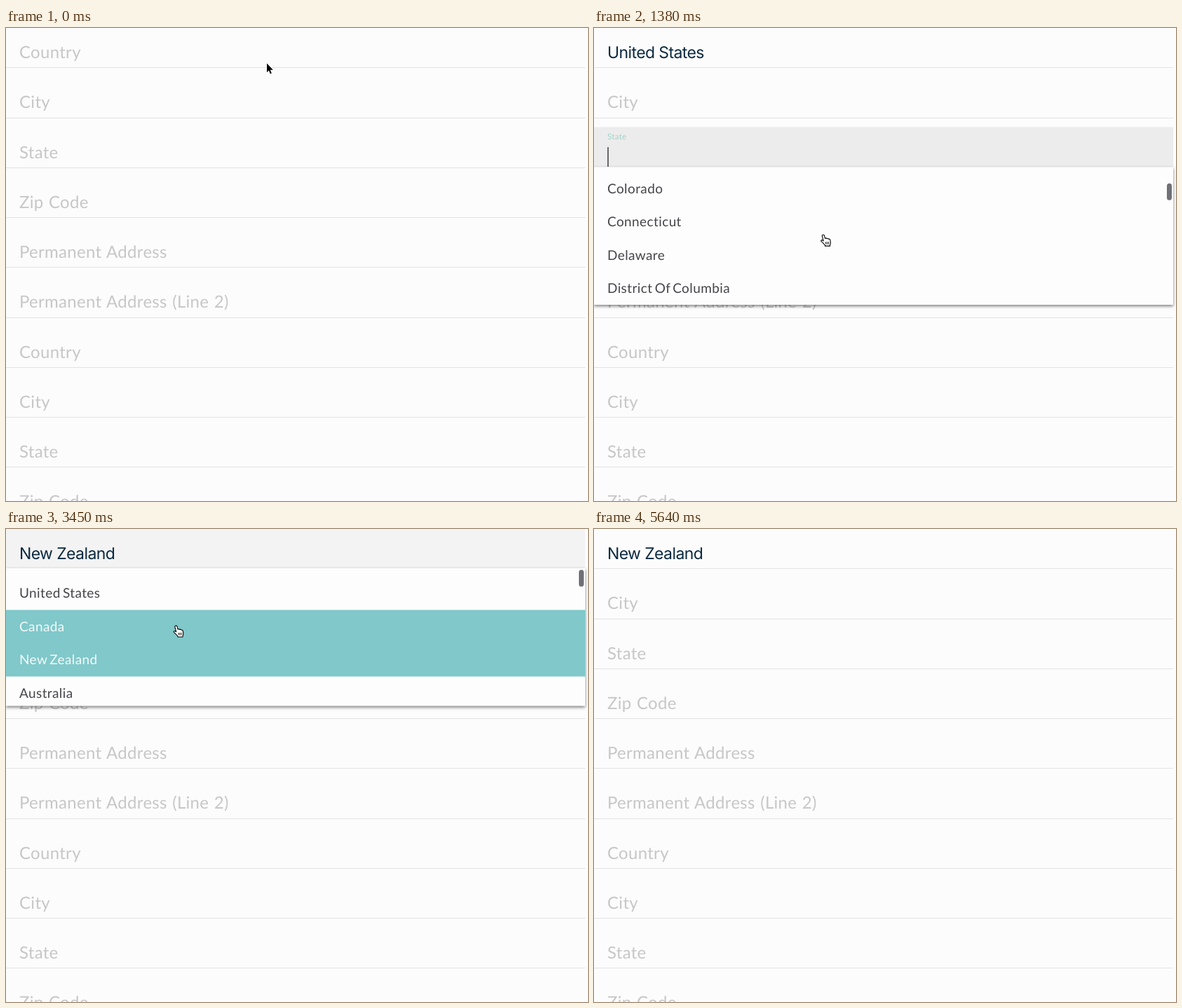
Recreate the animation shown at these times as an HTML page. Size 830x675 px, loop 5670 ms.

```html
<!DOCTYPE html>
<html lang="en">
<head>
<meta charset="utf-8">
<title>Address form</title>
<style>
  html, body { margin: 0; width: 100%; height: 100%; overflow: hidden; background: #fcfcfc; }
  svg { display: block; width: 830px; height: 675px; }
  text { font-family: Lato, sans-serif; text-rendering: geometricPrecision; }
  .label { font-size: 24px; letter-spacing: .3px; word-spacing: 1px; fill: #c7c7c7; }
  .value { font: 23px Inter, sans-serif; letter-spacing: -.6px; fill: #0b2a40; }
  .item { font-size: 19px; letter-spacing: .4px; word-spacing: -2px; }
  .panel { filter: drop-shadow(0 2.5px 2px rgba(0, 0, 0, .5)); }
</style>
</head>
<body>
<svg id="stage" viewBox="0 0 830 675"></svg>
<script>
const LOOP = 5670, STEP = 30;
const PITCH = 71.25, WIDTH = 826, ROW = 47.5, PANEL = 196.5, PAD = 12;

const labels = ['Country', 'City', 'State', 'Zip Code', 'Permanent Address',
  'Permanent Address (Line 2)', 'Country', 'City', 'State', 'Zip Code'];

const lists = {
  countries: ['United States', 'Canada', 'New Zealand', 'Australia', 'Afghanistan'],
  states: ['Alabama', 'Alaska', 'American Samoa', 'Arizona', 'Arkansas', 'California',
    'Colorado', 'Connecticut', 'Delaware', 'District Of Columbia', 'Florida', 'Georgia',
    'Guam', 'Hawaii', 'Idaho', 'Illinois'],
  provinces: ['Alberta', 'British Columbia', 'Manitoba', 'New Brunswick', 'Newfoundland and Labrador']
};

const shut = { list: '', focus: '', hover: -1 };
const pick = (sel, more) => ({ list: 'countries', focus: 'country', sel, hover: -1, ...more });
const choose = (list, more) => ({ list, focus: 'state', sel: -1, hover: -1, ...more });

// Each step changes part of the form state and holds until the next one.
const steps = [
  [0, { country: '', state: '', sel: -1, line: false, ...shut }],
  [210, pick(-1)],
  [300, { hover: 0 }],
  [480, { ...shut, country: 'United States' }],
  [660, choose('states')],
  [1410, { hover: 8 }],
  [1680, { ...shut, state: 'Delaware' }],
  [1770, pick(0)],
  [1800, { hover: 1 }],
  [1860, { hover: 2 }],
  [1980, { ...shut, country: 'New Zealand', state: '' }],
  [2520, { focus: 'state' }],
  [2970, pick(2)],
  [3030, { hover: 1 }],
  [3090, { ...shut, country: 'Canada' }],
  [3180, choose('provinces')],
  [3300, shut],
  [3330, pick(1, { hover: 2 })],
  [3390, { ...shut, country: 'New Zealand' }],
  [3420, pick(2, { hover: 1 })],
  [3540, { ...shut, country: 'Canada' }],
  [3600, choose('provinces')],
  [3780, shut],
  [3810, pick(1, { hover: 2 })],
  [3930, { ...shut, country: 'New Zealand', line: true }],
  [4020, { line: false }],
  [4050, { focus: 'state' }],
  [4890, shut]
];

const scrolls = [[780, 0], [1050, 282.5], [1320, 290]];
const floats = [[660, 0], [750, 1], [1980, 1], [2070, 0], [2520, 0], [2610, 1],
  [2970, 1], [3060, 0], [3150, 0], [3210, 1], [5400, 1], [5520, 0]];

// time, x, y, shape
const moves = [
  [0, 371.5, 50, 'arrow'], [180, 340, 42, 'arrow'], [240, 322, 78, 'hand'],
  [480, 315, 88, 'hand'], [540, 325, 150, 'arrow'], [600, 320, 175, 'beam'],
  [690, 328, 230, 'hand'], [1050, 324.5, 287, 'hand'], [1650, 320, 300, 'hand'],
  [1710, 300, 110, 'arrow'], [1770, 290, 45, 'arrow'], [1800, 270, 110, 'hand'],
  [1830, 254, 162, 'hand'], [1980, 254, 172, 'hand'], [2040, 258, 165, 'beam'],
  [2310, 262, 176, 'beam'], [2700, 270, 172, 'beam'], [2820, 285, 90, 'arrow'],
  [2910, 291, 41, 'arrow'], [3000, 265, 95, 'hand'], [3090, 252, 130, 'hand'],
  [3120, 248, 172, 'beam'], [3210, 245, 230, 'hand'], [3300, 246, 60, 'arrow'],
  [3360, 245, 175, 'hand'], [3420, 240, 80, 'hand'], [3450, 237.5, 137, 'hand'],
  [3540, 234, 132, 'hand'], [3570, 230, 176, 'beam'], [3630, 228, 230, 'hand'],
  [3780, 225, 60, 'arrow'], [3840, 222, 170, 'hand'], [3930, 218, 178, 'hand'],
  [3960, 216, 177, 'beam'], [3990, 214, 176.5, 'beam'], [5370, 215, 182, 'beam'],
  [5430, 208, 176, 'arrow'], [5610, 70, 28, 'arrow'], [5640, 70, 28, '']
];

const typed = { word: 'Wellington', from: 4110, rate: 45, select: 4590, clear: 4620 };

const stage = document.getElementById('stage');

function el(tag, attrs = {}, parent = stage, text = '') {
  const node = document.createElementNS('http://www.w3.org/2000/svg', tag);
  set(node, attrs);
  if (text) node.textContent = text;
  return parent.appendChild(node);
}
function set(node, attrs) {
  for (const key in attrs) node.setAttribute(key, attrs[key]);
}
function show(node, on) {
  node.style.display = on ? '' : 'none';
}
function write(node, text) {
  if (node.textContent !== text) node.textContent = text;
}
function mix(a, b, p) {
  return a + (b - a) * p;
}

// Segment of a keyed table at time t: the two keys and the share between them.
function segment(keys, t) {
  const i = keys.findLastIndex(key => key[0] <= t);
  if (i < 0) return [keys[0], keys[0], 0];
  const a = keys[i], b = keys[i + 1] || a;
  return [a, b, b === a ? 0 : (t - a[0]) / (b[0] - a[0])];
}
function ramp(keys, t) {
  const [a, b, p] = segment(keys, t);
  return mix(a[1], b[1], p);
}

// Form
const countryBack = el('rect', { width: WIDTH, height: 56.5, fill: '#f3f3f3' });
const stateBack = el('rect', { y: 141.5, width: WIDTH, height: 57, fill: '#ececec' });
const fields = labels.map((label, i) => {
  const y = i * PITCH;
  el('rect', { y: Math.round(56.25 + y), width: WIDTH, height: 1, fill: '#e3e3e3' });
  return el('text', { x: 19, y: 43 + y, class: 'label' }, stage, label);
});
const stateLine = el('path', { d: `M0 197.5H${WIDTH}`, stroke: '#acacb8', 'stroke-width': 1.4, 'stroke-dasharray': '5 3' });
const countryLine = el('rect', { y: 56.3, width: WIDTH + 2, height: 1.8, fill: '#a9ccf0' });
const countryText = el('text', { x: 19, y: 42.5, class: 'value' });
const marked = el('rect', { x: 19, y: 161, height: 28, fill: '#b3d7fe' });
const stateText = el('text', { x: 19, y: 183.5, class: 'value' });
const caret = el('rect', { width: 1.2, height: 28, fill: '#111' });

// Dropdown
const clip = el('clipPath', { id: 'view' }, el('defs'));
const clipRect = el('rect', { width: WIDTH }, clip);
const panel = el('g', { class: 'panel' });
const panelBack = el('rect', { width: WIDTH, fill: '#fdfdfd' }, panel);
const inner = el('g', { 'clip-path': 'url(#view)' }, panel);
const rows = lists.states.map(() => ({
  back: el('rect', { width: WIDTH, height: ROW, fill: '#80c8ca' }, inner),
  text: el('text', { x: 19, class: 'item' }, inner)
}));
const thumb = el('rect', { x: 817, width: 7, height: 24, rx: 3.5, fill: '#707078' }, inner);

// Pointers
const outline = { fill: '#fff', stroke: '#000', 'stroke-width': 1.1, 'stroke-linejoin': 'round' };
const pointers = { arrow: el('g'), hand: el('g'), beam: el('g') };
el('path', {
  d: 'M.5 .5V13.2L3.4 10.5 5.4 15.4 7.3 14.6 5.3 9.8H9.3Z',
  stroke: '#fff', 'stroke-width': 1.6, 'paint-order': 'stroke'
}, pointers.arrow);
el('path', {
  d: 'M4 1.2C5 .5 6.2 1.1 6.5 2.2L7.6 6.2C8.6 5.4 9.6 5.6 10 6.5 11 5.8 12 6.1 12.4 7.1 13.4 6.7 14.4 7.2 14.7 8.3'
    + 'L15.3 11.3C15.5 13.3 15 14.3 14.5 15.8V17H7.5V16C6 14 4.5 12.5 2 10.3 1.1 9.3 2.3 8.1 3.6 8.7L5.2 9.7 3.4 3C3.1 2.2 3.4 1.5 4 1.2Z',
  ...outline
}, pointers.hand);
el('path', { d: 'M8.6 11V14.5M10.6 11V14.5M12.6 11V14.5', stroke: '#000', 'stroke-width': .9 }, pointers.hand);
el('path', {
  d: 'M-3.5-8Q0-8 0-6V6Q0 8-3.5 8M3.5-8Q0-8 0-6M0 6Q0 8 3.5 8M-2 2.5H2',
  fill: 'none', stroke: '#111', 'stroke-width': 1.2
}, pointers.beam);

function drawPanel(s, t) {
  show(panel, s.list);
  if (!s.list) return;
  const top = s.focus === 'country' ? 56 : 198.5;
  const height = PANEL * Math.min(1, (t - s.opened + STEP) / 60);
  const scroll = s.list === 'states' ? ramp(scrolls, t)
    : s.list === 'countries' && s.sel === 0 ? PAD : 0;
  set(panelBack, { y: top, height });
  set(clipRect, { y: top, height });
  set(thumb, { y: top + 2.2 + (s.list === 'states' ? scroll * .0725 : 0) });
  rows.forEach((row, i) => {
    const name = lists[s.list][i] || '';
    const y = top + PAD + i * ROW - scroll;
    const lit = name && (i === s.sel || i === s.hover);
    show(row.back, lit);
    set(row.back, { y });
    set(row.text, { y: y + 30, fill: lit ? '#f4fafa' : '#45454a' });
    write(row.text, name);
  });
}

function drawState(s, t) {
  const focused = s.focus === 'state', open = focused && s.list;
  const typing = t >= typed.from && t < typed.clear;
  const count = Math.floor((t - typed.from) / typed.rate);
  const value = typing ? typed.word.slice(0, Math.max(0, count)) : s.state;
  const p = ramp(floats, t), label = fields[2];
  set(label, { y: mix(185.5, open ? 158.5 : 155.5, p) });
  label.style.fontSize = mix(24, 11.5, p) + 'px';
  label.style.fill = p < .5 ? '' : focused ? '#a3d3cb' : '#9c9c9c';
  show(stateBack, focused);
  show(stateLine, focused && !open);
  write(stateText, value);
  const end = value ? stateText.getComputedTextLength() : 0;
  const selected = typing && t >= typed.select;
  show(marked, selected);
  if (selected) set(marked, { width: end });
  show(caret, focused && !selected);
  set(caret, { x: (open ? 19.4 : 18.7) + end, y: open ? 170 : 161 });
}

function drawPointer(t) {
  const [a, b, p] = segment(moves, t);
  for (const name in pointers) show(pointers[name], name === a[3]);
  if (a[3]) set(pointers[a[3]], { transform: `translate(${mix(a[1], b[1], p)} ${mix(a[2], b[2], p)})` });
}

function draw(t) {
  const s = {};
  for (const [at, patch] of steps) {
    if (at > t) break;
    if (patch.list) s.opened = at;
    Object.assign(s, patch);
  }
  show(countryBack, s.focus === 'country');
  show(countryLine, s.line);
  show(fields[0], !s.country);
  write(countryText, s.country);
  drawState(s, t);
  drawPanel(s, t);
  drawPointer(t);
}

function frame() {
  const t = performance.now() % LOOP;
  draw(Math.floor(t / STEP) * STEP);
  requestAnimationFrame(frame);
}
frame();
</script>
</body>
</html>
```
